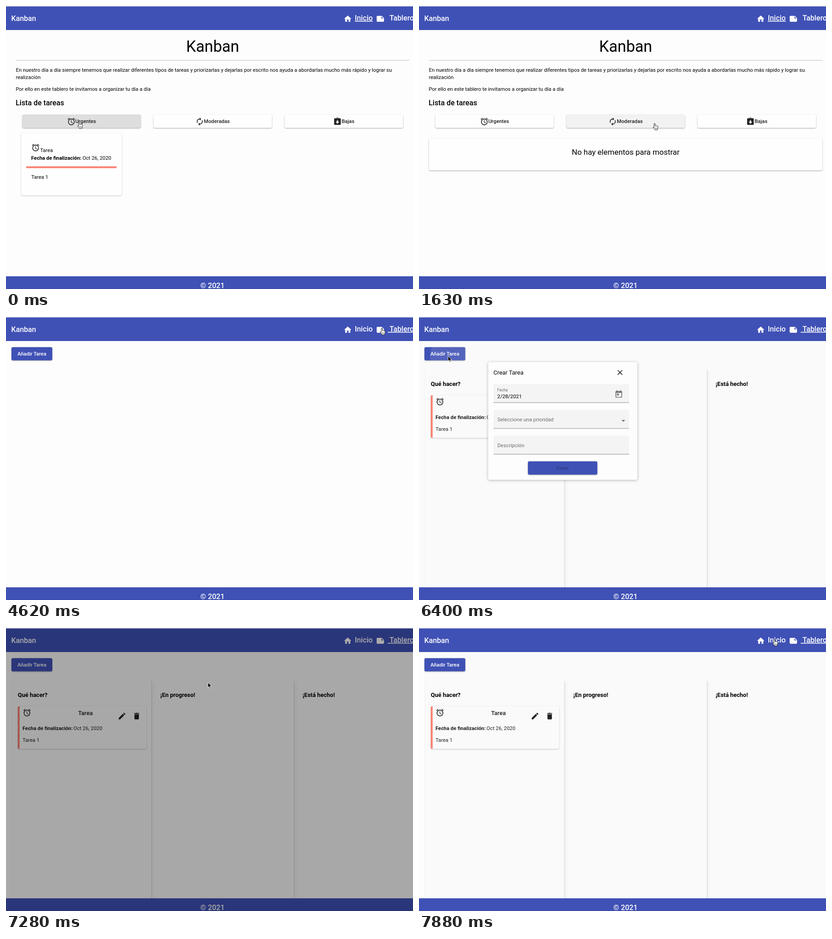
Write an HTML page that moves like this. It is 897x624 px and loops after 8 s.

```html
<!DOCTYPE html>
<html lang="es">
<head>
<meta charset="utf-8">
<title>Kanban</title>
<style>
  html, body { margin: 0; width: 100%; height: 100%; overflow: hidden; background: #fdfdfd; }
  svg { display: block; position: absolute; left: 0; top: 0; }
  text { font-family: Roboto, sans-serif; white-space: pre; }
  .raised { filter: drop-shadow(0 1.2px .9px rgba(0, 0, 0, .36)); }
  .soft { filter: drop-shadow(.8px 1.4px 1.6px rgba(0, 0, 0, .22)); }
  .column { filter: drop-shadow(1px 2px 1.6px rgba(0, 0, 0, .2)); }
  .modal { filter: drop-shadow(0 1px 3px rgba(0, 0, 0, .28)); }
  .on { text-decoration: underline; }
</style>
</head>
<body>
<svg id="stage" width="897" height="624" viewBox="0 0 897 624"></svg>
<script>
const LOOP = 8000, STEP = 148.8;
const BLUE = '#3f51b5', SALMON = '#fa8072', INK = '#212121', BASE = 11.34;

const ICONS = {
  home: 'M10 20v-6h4v6h5v-8h3L12 3 2 12h3v8z',
  note: 'M22 10l-6-6H4c-1.1 0-2 .9-2 2v12c0 1.1.9 2 2 2h16c1.1 0 2-.9 2-2v-8zm-7-4.5l5.5 5.5H15V5.5z',
  alarm: 'M22 5.72l-4.6-3.86-1.29 1.53 4.6 3.86L22 5.72zM7.88 3.39L6.6 1.86 2 5.71l1.29 1.53 4.59-3.85zM12.5 8H11v6l4.75 2.85.75-1.23-4-2.37V8zM12 4a9 9 0 1 0 0 18a9 9 0 1 0 0-18zm0 16a7 7 0 1 1 0-14a7 7 0 1 1 0 14z',
  renew: 'M12 6v3l4-4-4-4v3c-4.42 0-8 3.58-8 8 0 1.57.46 3.03 1.24 4.26L6.7 14.8c-.45-.83-.7-1.79-.7-2.8 0-3.31 2.69-6 6-6zm6.76 1.74L17.3 9.2c.44.84.7 1.79.7 2.8 0 3.31-2.69 6-6 6v-3l-4 4 4 4v-3c4.42 0 8-3.58 8-8 0-1.57-.46-3.03-1.24-4.26z',
  returned: 'M19 3h-4.18C14.4 1.84 13.3 1 12 1s-2.4.84-2.82 2H5c-1.1 0-2 .9-2 2v14c0 1.1.9 2 2 2h14c1.1 0 2-.9 2-2V5c0-1.1-.9-2-2-2zm-7 0c.55 0 1 .45 1 1s-.45 1-1 1-1-.45-1-1 .45-1 1-1zm0 15l-5-5h3V9h4v4h3l-5 5z',
  edit: 'M3 17.25V21h3.75L17.81 9.94l-3.75-3.75L3 17.25zM20.71 7.04c.39-.39.39-1.02 0-1.41l-2.34-2.34c-.39-.39-1.02-.39-1.41 0l-1.83 1.83 3.75 3.75 1.83-1.83z',
  bin: 'M6 19c0 1.1.9 2 2 2h8c1.1 0 2-.9 2-2V7H6v12zM19 4h-3.5l-1-1h-5l-1 1H5v2h14V4z',
  close: 'M19 6.41L17.59 5 12 10.59 6.41 5 5 6.41 10.59 12 5 17.59 6.41 19 12 13.41 17.59 19 19 17.59 13.41 12z',
  calendar: 'M19 3h-1V1h-2v2H8V1H6v2H5c-1.1 0-2 .9-2 2v14c0 1.1.9 2 2 2h14c1.1 0 2-.9 2-2V5c0-1.1-.9-2-2-2zm0 16H5V8h14v11zM7 10h5v5H7z'
};

const text = (x, y, s, size = BASE, attrs = '') =>
  `<text x="${x}" y="${y}" font-size="${size}" ${attrs}>${s}</text>`;
const rect = (x, y, w, h, fill, attrs = '') =>
  `<rect x="${x}" y="${y}" width="${w}" height="${h}" fill="${fill}" ${attrs}/>`;
const icon = (name, cx, cy, fill = INK) =>
  `<path transform="translate(${cx - 9.72} ${cy - 9.72}) scale(.81)" fill="${fill}" d="${ICONS[name]}"/>`;
const group = (id, ...parts) => `<g id="${id}">${parts.join('')}</g>`;

const MEDIUM = 'font-weight="500"', BOLD = 'font-weight="700"';
const MIDDLE = 'text-anchor="middle"', WHITE = 'fill="#fff"';

const filters = [
  { x: 36, icon: 'alarm', ix: 144, tx: 152.7, label: 'Urgentes' },
  { x: 325, icon: 'renew', ix: 427, tx: 436, label: 'Moderadas' },
  { x: 614, icon: 'returned', ix: 730.5, tx: 739.7, label: 'Bajas' }
];
const filterButton = (f, i) =>
  rect(f.x, 239.5, 261, 29.3, '#fff', `rx="3.2" class="raised" id="filter${i}"`) +
  icon(f.icon, f.ix, 254.8) + text(f.tx, 258.4, f.label, BASE, `${MEDIUM} fill="${INK}"`);

const column = (x, title) =>
  rect(x, 112, 306.5, 520, '#fdfdfd', 'rx="8" class="column"') +
  text(x + 12, 152, title, 12.96, BOLD);

const field = y =>
  rect(164, y, 299, 41, '#f4f4f4', 'rx="3"') + rect(164, y + 40.3, 299, 1, '#8c8c8c');

const home = group('home',
  text(455.5, 100.6, 'Kanban', 34.6, MIDDLE),
  rect(22, 119.3, 867, 1, '#bdbdbd'),
  text(21.7, 145, 'En nuestro día a día siempre tenemos que realizar diferentes tipos de tareas y priorizarlas y dejarlas por escrito nos ayuda a abordarlas mucho más rápido y lograr su'),
  text(21.7, 161, 'realización'),
  text(21.4, 187, 'Por ello en este tablero te invitamos a organizar tu día a día'),
  text(21.3, 219.2, 'Lista de tareas', 16.2, MEDIUM),
  ...filters.map(filterButton),
  group('urgent',
    rect(33.5, 280, 221.5, 137.5, '#fefefe', 'rx="3.5" class="soft"'),
    icon('alarm', 65.3, 312.3),
    text(75.2, 322, 'Tarea'),
    text(55.5, 338.6, 'Fecha de finalización:', BASE, BOLD),
    text(168.4, 338.6, 'Oct 26, 2020'),
    rect(44.5, 353.5, 199, 4, SALMON),
    text(55.7, 381.4, 'Tarea 1')),
  group('empty',
    rect(22, 291.8, 867, 70.6, '#fefefe', 'rx="3.2" class="raised"'),
    text(455.5, 328, 'No hay elementos para mostrar', 17, MIDDLE)));

const board = group('board',
  rect(0, 53, 897, 545, '#fafafa', 'id="tint"'),
  group('columns',
    column(14, 'Qué hacer?'), column(328, '¡En progreso!'), column(641.7, '¡Está hecho!'),
    rect(26, 172.4, 283, 94, '#fdfdfd', 'rx="3.2" class="soft" id="task"'),
    `<path d="M30 172.4h-1a3 3 0 0 0-3 3v88a3 3 0 0 0 3 3h1z" fill="${SALMON}"/>`,
    icon('alarm', 46.2, 186.7),
    text(159, 192.3, 'Tarea', 12.96, `${MEDIUM} fill="${INK}"`),
    icon('edit', 255.7, 194.2), icon('bin', 288, 194.2),
    text(36.2, 225, 'Fecha de finalización:', BASE, `${BOLD} fill="${INK}"`),
    text(148.8, 225, 'Oct 26, 2020', BASE, `fill="${INK}"`),
    text(36.4, 251, 'Tarea 1', BASE, `fill="${INK}"`)),
  rect(12, 66.5, 90, 29, BLUE, 'rx="3.2" class="raised"'),
  '<clipPath id="addClip"><rect x="12" y="66.5" width="90" height="29" rx="3.2"/></clipPath>',
  '<circle id="ripple" cx="66" cy="86" fill="#fff" opacity=".11" clip-path="url(#addClip)"/>',
  text(57, 85, 'Añadir Tarea', BASE, `${MEDIUM} ${MIDDLE} ${WHITE}`));

const bars =
  rect(0, 0, 897, 2, '#ececf2') + rect(0, 1, 897, 52, BLUE) +
  text(11.5, 33.4, 'Kanban', 16.2, `${MEDIUM} ${WHITE}`) +
  icon('home', 753.2, 28.2, '#fff') +
  text(768.7, 31.8, 'Inicio', 16.2, `${MEDIUM} ${WHITE} id="navHome"`) +
  icon('note', 825, 28.2, '#fff') +
  text(841.2, 31.8, '\u00a0Tablero', 16.2, `${MEDIUM} ${WHITE} id="navBoard"`) +
  rect(0, 596, 897, 28, BLUE) + rect(0, 623, 897, 1, '#38479f') +
  text(455, 622, '© 2021', 16.2, `${MEDIUM} ${MIDDLE} ${WHITE}`);

const hint = 'fill="#6a6a6a"';
const dialog = group('dialog',
  rect(152.5, 99.5, 328.5, 259.5, '#fdfdfd', 'rx="4" class="modal"'),
  text(164, 127, 'Crear Tarea', 12.96),
  icon('close', 443, 122.3),
  field(148),
  text(172.6, 164, 'Fecha', 8.5, hint), text(172.6, 179, '2/28/2021'),
  icon('calendar', 440.3, 170.5, '#707070'),
  field(205), text(172.7, 230, 'Seleccione una prioridad', BASE, hint),
  '<path d="M446.3 227h8.2l-4.1 4.1z" fill="#707070"/>',
  field(261.7), text(172.7, 286.8, 'Descripción', BASE, hint),
  rect(240, 318.3, 153, 29.2, BLUE, 'rx="3.2" class="raised"'),
  text(316.5, 336.8, 'Crear', BASE, `${MEDIUM} ${MIDDLE} fill="#000" fill-opacity=".27"`));

const cursor = group('cursor',
  '<path id="arrow" d="M0 0v11.5l2.7-2.5 1.8 4.2 1.9-.8-1.8-4.1h3.6z" stroke="#fff" stroke-width=".9"/>',
  `<g id="hand" transform="translate(2 7)" stroke="#111" stroke-width=".9" stroke-linejoin="round">
    <path fill="#fff" d="M-3 2V-6a1.2 1.2 0 0 1 2.4 0v4.4a1.1 1.1 0 0 1 2.1.2a1.1 1.1 0 0 1 2 .4a1 1 0 0 1 1.9.6v3c0 1.8-1 2.6-1.2 4.6h-5.4c-.6-2-2.8-3.3-3.7-5.2c-.5-1.4 1-1.8 1.9-.5z"/>
    <path fill="none" stroke-width=".7" d="M-.6 2.4v2.8M1.2 2.4v2.8M3 2.4v2.8"/></g>`);

document.getElementById('stage').innerHTML =
  home + board + bars + rect(0, 1, 897, 623, '#000', 'id="shade"') + dialog + cursor;

const $ = id => document.getElementById(id);
const show = (id, on) => $(id).style.display = on ? '' : 'none';

// Pointer waypoints: step, x, y
const route = [
  [0, 161, 256], [4, 330, 265], [8, 519, 259], [11, 519, 259], [17, 757, 247], [18, 757, 247],
  [19, 700, 253], [21, 700, 253], [22, 770, 130], [23, 845, 7], [24, 845, 7], [26, 865, 25],
  [30, 865, 25], [31, 828, 25], [32, 282, 181], [34, 282, 181], [36, 123, 95], [37, 123, 95],
  [39, 64, 86], [43, 64, 86], [45, 413, 146], [47, 445, 120], [49, 445, 120], [53, 783, 25]
];
function pointer(k) {
  const i = route.findIndex(p => p[0] >= k);
  if (i < 0) return route[route.length - 1].slice(1);
  const b = route[i], a = route[Math.max(0, i - 1)];
  const p = b === a ? 1 : (k - a[0]) / (b[0] - a[0]);
  return [a[1] + (b[1] - a[1]) * p, a[2] + (b[2] - a[2]) * p];
}
const inside = (x, y, l, t, w, h) => x >= l && x <= l + w && y >= t && y <= t + h;
const easeOut = p => 1 - (1 - Math.min(1, Math.max(0, p))) ** 4;

function draw(now) {
  const k = Math.min(53, Math.floor((now % LOOP + 12) / STEP));
  const onBoard = k >= 28, open = k >= 43 && k < 49;
  const [x, y] = pointer(k);

  show('home', !onBoard);
  show('board', onBoard);
  show('urgent', k < 9);
  show('empty', k >= 9);
  show('columns', k >= 32);
  show('tint', k >= 43);
  show('dialog', open);
  $('tint').setAttribute('x', k < 49 ? 0 : 12);
  document.querySelectorAll('.column, #task').forEach(c => c.setAttribute('fill', k < 43 ? '#fdfdfd' : '#fafafa'));
  $('navHome').setAttribute('class', onBoard ? '' : 'on');
  $('navBoard').setAttribute('class', onBoard ? 'on' : '');

  let hand = inside(x, y, 743, 14, 154, 30) || (onBoard && k < 43 && inside(x, y, 12, 66, 90, 30));
  filters.forEach((f, i) => {
    const over = !onBoard && inside(x, y, f.x, 239, 261, 30);
    const pressed = i === 0 ? k < 9 : i === 1 && k >= 8 && k < 11;
    $('filter' + i).setAttribute('fill', pressed ? '#dedede' : over ? '#f2f2f2' : '#fefefe');
    hand = hand || over;
  });

  $('ripple').setAttribute('r', k >= 42 && k < 45 ? (k - 41) * 21 : 0);
  const dim = easeOut((k - 43) / 2.7) - easeOut((k - 49) / 2.7);
  $('shade').setAttribute('opacity', .33 * dim);

  show('hand', hand);
  show('arrow', !hand);
  $('cursor').setAttribute('transform', `translate(${x} ${y})`);
}

function tick() {
  draw(performance.now());
  requestAnimationFrame(tick);
}
tick();
</script>
</body>
</html>
```
